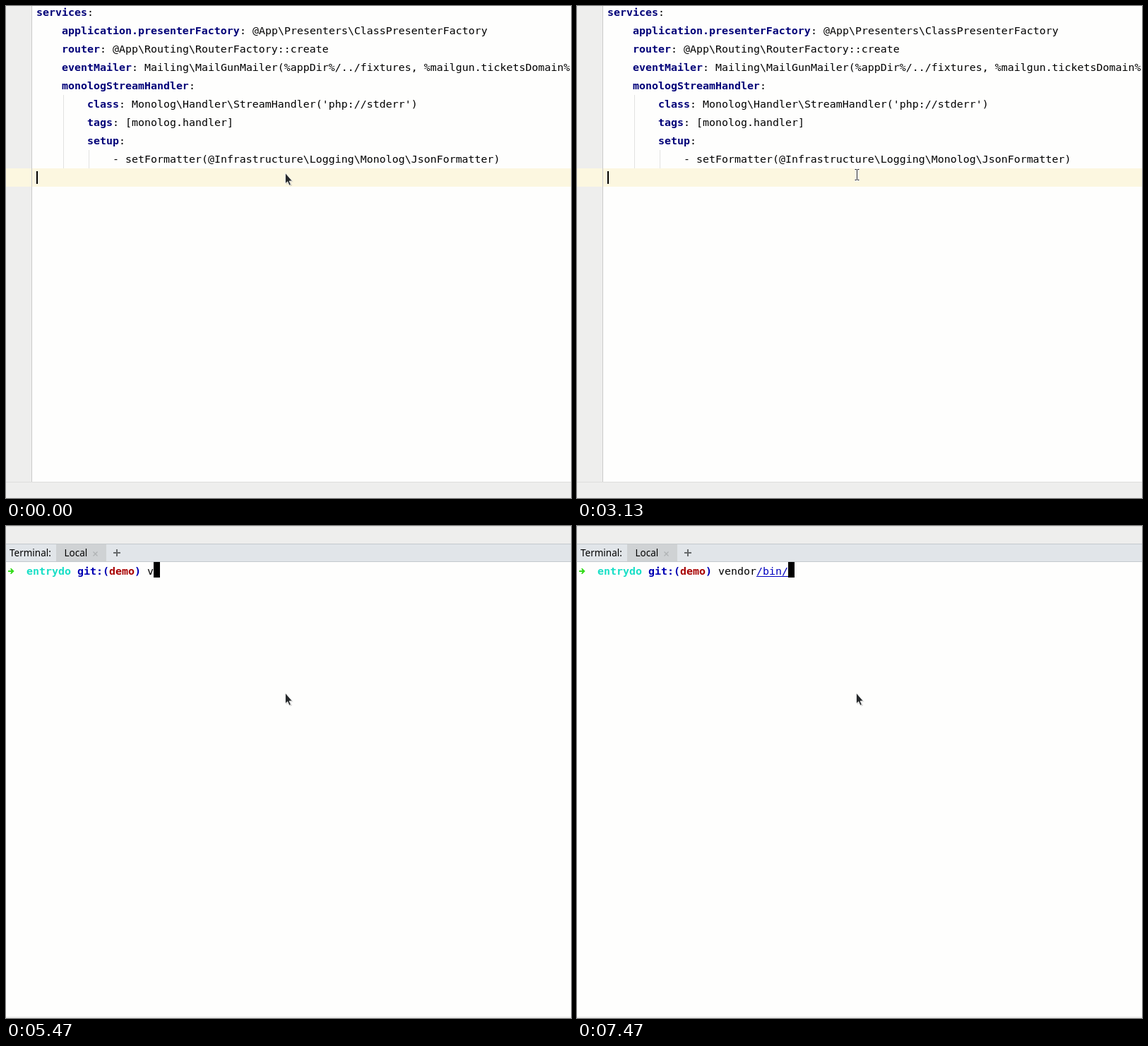
An HTML page for the animation above (8 s loop, 800 px wide and 697 px high).

```html
<!DOCTYPE html>
<html lang="en">
<head>
<meta charset="utf-8">
<title>Editor and terminal</title>
<style>
  html, body { margin: 0; width: 100%; height: 100%; overflow: hidden; background: #fefefd; }
  svg { display: block; width: 800px; height: 697px; }
  text { white-space: pre; }
  .mono { font: 14.95px "DejaVu Sans Mono", monospace; }
  .ui { font: 13.5px "Noto Sans", "Open Sans", sans-serif; }
  .key { font-weight: bold; fill: #000078; }
  .bold { font-weight: bold; }
</style>
</head>
<body>
<svg viewBox="0 0 800 697">
  <rect width="800" height="697" fill="#fefefd"/>

  <g id="editor">
    <rect width="36" height="674" fill="#eeeeed"/>
    <rect y="230" width="800" height="26" fill="#fcf7e0"/>
    <rect x="36" width="1" height="674" fill="#cbcbca"/>
    <rect x="81" y="126" width="1" height="104" fill="#e2e2e1"/>
    <rect x="117" y="204" width="1" height="26" fill="#e2e2e1"/>
    <g id="lines" class="mono"></g>
    <rect id="caret" x="43" y="234" width="2" height="18"/>
    <rect y="674" width="800" height="23" fill="#eeeeed"/>
    <rect y="674" width="800" height="1" fill="#dededd"/>
  </g>

  <g id="terminal">
    <rect width="800" height="25" fill="#eeeeed"/>
    <rect width="800" height="1" fill="#dededd"/>
    <rect y="25" width="800" height="26" fill="#e1e5e9"/>
    <rect x="71" y="26" width="71" height="24" fill="#cfd2d4"/>
    <rect y="25" width="800" height="1" fill="#c4c9cd"/>
    <rect y="50" width="800" height="1" fill="#c4c9cd"/>
    <g class="ui">
      <text x="5" y="43">Terminal:</text>
      <text x="82.5" y="43">Local</text>
    </g>
    <path d="M123.5 36.5l6 6m0-6l-6 6" stroke="#afb2b4" stroke-width="1.2"/>
    <path d="M152 38h10m-5-5v10" stroke="#66696b" stroke-width="2"/>
    <path d="M3 63h4.3l-1.2-3h1.5l4 4-4 4h-1.5l1.2-3h-4.3z" fill="#35dc1c"/>
    <g class="mono">
      <g class="bold">
        <text x="29" y="69" fill="#18dfc6">entrydo</text>
        <text x="101" y="69" fill="#0000b4">git:(</text>
        <text x="146" y="69" fill="#a80000">demo</text>
        <text x="182" y="69" fill="#0000b4">)</text>
      </g>
      <text id="typed" x="200" y="69"></text>
      <text id="link" x="254" y="69" fill="#0000c0"></text>
    </g>
    <rect id="underline" x="254" y="71" height="1" fill="#0000c0"/>
    <rect id="block" y="51" width="9" height="22"/>
    <rect y="695" width="800" height="2" fill="#eeeeed"/>
  </g>

  <g id="arrow">
    <path d="M397 239v14l3-2.5 2.4 5 2.8-1.2-2.3-5h4z" fill="#000" opacity=".13"/>
    <path d="M395.5 236.5v15.2l3.2-2.9 2.3 5.4 2.4-1-2.3-5.2h4.3z"
      fill="#25282a" stroke="#fff" stroke-width=".8"/>
  </g>
  <g id="beam" fill="none">
    <path d="M393 231.5h7M393 246.5h7M396.5 231v16" stroke="#fff" stroke-width="3"/>
    <path d="M393.5 231.5h2.5m1 0h2.5M393.5 246.5h2.5m1 0h2.5M396.5 232v14" stroke="#222"/>
  </g>
</svg>
<script>
const LOOP = 8000, CELL = 9, OPEN = 4330;
const $ = id => document.getElementById(id);

// [indent, key, rest]
const code = [
  [0, "services", ":"],
  [4, "application.presenterFactory", ": @App\\Presenters\\ClassPresenterFactory"],
  [4, "router", ": @App\\Routing\\RouterFactory::create"],
  [4, "eventMailer", ": Mailing\\MailGunMailer(%appDir%/../fixtures, %mailgun.ticketsDomain%"],
  [4, "monologStreamHandler", ":"],
  [8, "class", ": Monolog\\Handler\\StreamHandler('php://stderr')"],
  [8, "tags", ": [monolog.handler]"],
  [8, "setup", ":"],
  [12, "", "- setFormatter(@Infrastructure\\Logging\\Monolog\\JsonFormatter)"]
];

function addText(col, row, str, cls) {
  const el = document.createElementNS("http://www.w3.org/2000/svg", "text");
  el.setAttribute("x", 43 + col * CELL);
  el.setAttribute("y", 14 + row * 26);
  el.setAttribute("class", cls);
  el.textContent = str;
  $("lines").append(el);
}

code.forEach(([indent, key, rest], row) => {
  if (key) addText(indent, row, key, "key");
  addText(indent + key.length, row, rest, "");
});

const command = "vendor/bin/", dirLength = 6, linkTime = 7330;
// Moment at which each character appears
const keyTimes = [5470, 5530, 5730, 5870, 6530, 6600, 6800, 7130, 7330, 7330, 7470];
const caretFlips = [470, 1130, 1600, 2130, 2600, 3130, 3600, 4130];

const passed = (times, t) => times.filter(at => t >= at).length;
const show = (id, on) => $(id).setAttribute("visibility", on ? "visible" : "hidden");

function draw(t) {
  const open = t >= OPEN;
  $("editor").style.display = open ? "none" : "";
  $("terminal").style.display = open ? "" : "none";

  const beam = t >= 70 && t < 4200;
  show("beam", beam);
  show("arrow", !beam);
  show("caret", passed(caretFlips, t) % 2 === 0);

  const count = passed(keyTimes, t);
  const split = t >= linkTime ? dirLength : count;
  $("typed").textContent = command.slice(0, split);
  $("link").textContent = command.slice(split, count);
  $("underline").setAttribute("width", (count - split) * CELL);
  $("block").setAttribute("x", 200 + count * CELL);
  show("block", t < 5270 || t >= keyTimes[0]);
}

const start = performance.now();
function tick(now) {
  draw(Math.max(0, now - start) % LOOP);
  requestAnimationFrame(tick);
}
draw(0);
requestAnimationFrame(tick);
</script>
</body>
</html>
```
